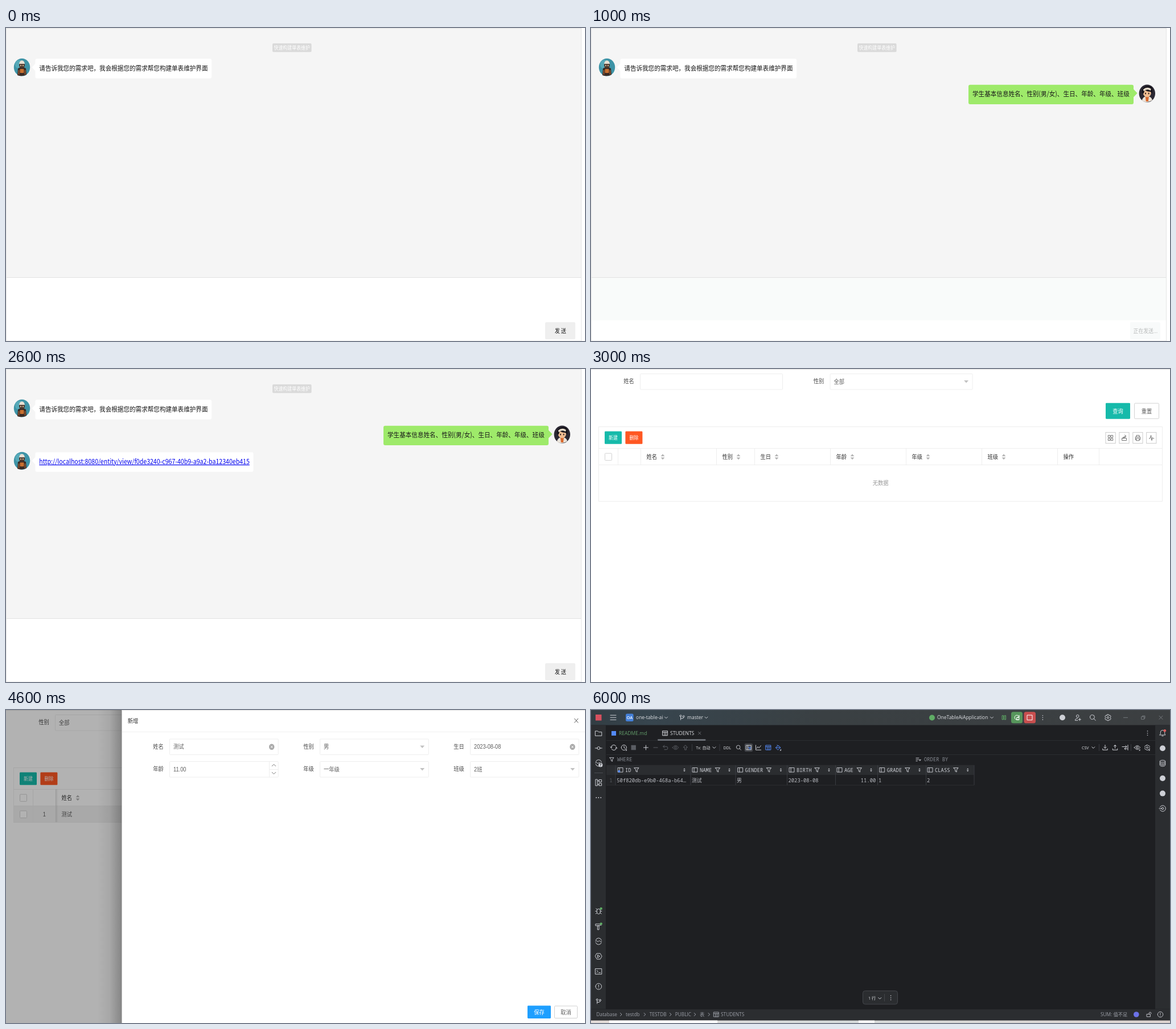
These frames come from a looping animation (1017 by 550 pixels, 7000 ms). An HTML page:

```html
<!DOCTYPE html>
<html lang="zh">
<head>
<meta charset="utf-8">
<title>单表维护</title>
<style>
html, body { margin: 0; width: 100%; height: 100%; overflow: hidden; background: #fff; }
svg { display: block; width: 1017px; height: 550px; }
.scene { opacity: 0; animation: turn 7s step-end infinite; }
@keyframes turn { 0% { opacity: 1; } 14.286%, 100% { opacity: 0; } }
.chat { font-family: "Noto Sans CJK SC", "Noto Sans CJK", sans-serif; }
.page { font-family: "Liberation Sans", "Noto Sans CJK SC", "Noto Sans CJK", sans-serif; }
.ide { font-family: "Open Sans", "Noto Sans CJK SC", "Noto Sans CJK", sans-serif; }
.mono { font-family: "Noto Sans Mono", "Noto Sans CJK SC", "Noto Sans CJK", monospace; }
.ico { fill: none; stroke-linecap: round; stroke-linejoin: round; }
</style>
</head>
<body>
<svg id="stage" viewBox="0 0 1017 550">
<defs>
  <linearGradient id="shade"><stop offset="0" stop-opacity="0"/><stop offset=".5" stop-opacity=".06"/><stop offset="1" stop-opacity=".26"/></linearGradient>
  <linearGradient id="pin"><stop offset="0" stop-opacity=".1"/><stop offset="1" stop-opacity="0"/></linearGradient>
  <linearGradient id="bar"><stop offset="0" stop-color="#323d43"/><stop offset=".1" stop-color="#37454e"/><stop offset=".4" stop-color="#3a4043"/><stop offset="1" stop-color="#3c3f41"/></linearGradient>
  <linearGradient id="task"><stop offset="0" stop-color="#e3dcd8"/><stop offset=".4" stop-color="#d5dada"/><stop offset="1" stop-color="#dcd3cf"/></linearGradient>
</defs>
</svg>
<script>
// Web pages are shown at SX by SY of their CSS size.
const SX = .6621, SY = .74;

const rect = (x, y, w, h, fill, r = 0, line = 'none') =>
  `<rect x="${x}" y="${y}" width="${w}" height="${h}" rx="${r}" fill="${fill}" stroke="${line}"/>`;
const path = (d, fill) => `<path d="${d}" fill="${fill}"/>`;
const oval = (x, y, rx, ry, fill) => `<ellipse cx="${x}" cy="${y}" rx="${rx}" ry="${ry}" fill="${fill}"/>`;
const hline = (x, y, w, c) => rect(x, y, w, 1, c);
const vline = (x, y, h, c) => rect(x, y, 1, h, c);

// Page text, centred vertically on y; size in CSS pixels.
const label = (x, y, s, { px = 14, fill = '#5f5f5f', at = 'start', w = 400, more = '' } = {}) =>
  `<text transform="translate(${x} ${y + px * SY * .38}) scale(${SX / SY} 1)" font-size="${px * SY}"
    fill="${fill}" text-anchor="${at}" font-weight="${w}" ${more}>${s}</text>`;
const mid = (x, y, s, fill, px = 14, w = 400) => label(x, y, s, { px, fill, at: 'middle', w });

/* ---------- chat ---------- */
const robot = y => `<g transform="translate(28 ${y})">` +
  oval(0, 0, 14.2, 15.6, '#3d93a6') + oval(-4, -5, 8, 8, '#56a9b8') +
  path('M-8 14L-7 2Q0-3 7 2L8 13Q0 17-8 14Z', '#3a2b25') +
  oval(0, -4, 5, 6, '#4a352c') + path('M-5-6Q-4-12 0-12T5-6Z', '#e8e0d3') +
  oval(-2, -3, 1.2, 1.4, '#c9b08f') + oval(2, -3, 1.2, 1.4, '#c9b08f') +
  rect(-3.5, 3, 7, 7, '#c8702f', 1) + rect(-6.5, 5, 2, 8, '#8a5432') + rect(4.5, 5, 2, 8, '#8a5432') + '</g>';

const boy = y => `<g transform="translate(976.8 ${y})">` +
  oval(0, 0, 14.2, 15.6, '#2b2833') +
  path('M-9 13Q-8 5 0 5T9 12Q0 18-9 13Z', '#e9e2d8') + path('M-3 6L3 6L2 14L-2 14Z', '#d9682d') +
  oval(0, -1, 7, 7.5, '#f0bd92') + path('M-9-1Q-10-12 1-13T9 0L6-3Q0-3-4-6L-6 0Z', '#17141b') +
  path('M-7-7Q0-13 7-8L6-5Q0-9-6-4Z', '#e6dccb') +
  oval(-2.8, 0, 1, 1.5, '#2a1c1a') + oval(2.8, 0, 1, 1.5, '#2a1c1a') + '</g>';

const bubble = (y, w, s, more = {}) => robot(y + 15) + rect(51.5, y, w, 34.4, '#fff', 3) +
  path(`M45.5 ${y + 15}L52 ${y + 8}V${y + 22}Z`, '#fff') +
  label(58.3, y + 16.1, s, { px: 16, fill: '#1a1a1a', ...more });

function chat(step) {
  const busy = step === 1;
  let out = rect(0, 0, 1017, 550, '#fff') + rect(0, 0, 1010, 439, '#f5f5f5') +
    hline(0, 0, 1011, '#e4e4e4') + hline(0, 438, 1011, '#e2e2e2') + hline(0, 549, 1011, '#f0f0f0') +
    vline(0, 0, 550, '#e6e6e6') + vline(1010, 0, 550, '#e6e6e6') +
    rect(468, 27, 68.6, 15.2, '#dadada', 2) + mid(502.2, 34.7, '快速构建单表维护', '#fff', 12, 500) +
    bubble(54, 309.7, '请告诉我您的需求吧，我会根据您的需求帮您构建单表维护界面');
  if (step) out += rect(663, 99.7, 290, 34.4, '#9eea6a', 3) + path('M959.6 114.5L952.5 107V122Z', '#9eea6a') +
    label(670, 116, '学生基本信息姓名、性别(男/女)、生日、年龄、年级、班级', { px: 16, fill: '#1a1a1a' }) + boy(115);
  if (step === 2) out += bubble(146.3, 383,
    'http://localhost:8080/entity/view/f0de3240-c967-40b9-a9a2-ba12340eb415',
    { fill: '#0000ee', more: 'text-decoration="underline"' });
  if (busy) out += rect(1, 439, 1009, 74.5, '#f9fbfa');
  return out + rect(947, 517, 53, 30, busy ? '#f8fafa' : '#efefef', 2) +
    mid(973.9, 532.5, busy ? '正在发送...' : '发 送', busy ? '#b8baba' : '#111', 13.333);
}

/* ---------- table page ---------- */
const EDGE = '#eeeeee', TEAL = '#16baaa';
const caret = (x, y) => path(`M${x - 4} ${y - 2}H${x + 4}L${x} ${y + 2.4}Z`, '#c2c2c2');
const check = y => rect(24.5, y - 6.2, 12, 12.4, '#fff', 1, '#d2d2d2');
const button = (x, y, w, h, s, fill, px) => rect(x, y, w, h, fill, 1.4) + mid(x + w / 2, y + h / 2, s, '#fff', px, 500);
const ghost = (x, y, w, h, s) => rect(x + .5, y + .5, w - 1, h - 1, '#fff', 1.4, '#d2d2d2') + mid(x + w / 2, y + h / 2, s, '#5f5f5f');
const field = (x, y, w, name, value, pick) =>
  label(x - 10.3, y + 13.5, name, { at: 'end', fill: '#4a4a4a' }) + rect(x + .5, y + .5, w, 27.5, '#fff', 1, EDGE) +
  label(x + 7, y + 14, value) + (pick ? caret(x + w - 10.5, y + 14) : '');
const sorter = x => path(`M${x - 3.4} 153.2H${x + 3.4}L${x} 149.4ZM${x - 3.4} 155.4H${x + 3.4}L${x} 159.2Z`, '#b2b2b2');

const TOOLS = [
  'M-4-4.5H-.8V-.8H-4ZM.8-4.5H4V-.8H.8ZM-4 1H-.8V4.6H-4ZM.8 1H4V4.6H.8Z',
  'M-4 1V4.5H4V1ZM-3 1L-2-1H2M-1 1Q-1-3 2-3M1-5L3.4-3L1-1',
  'M-2.6-1.5V-4.5H2.6V-1.5M-2.6 3H-4.2V-1.5H4.2V3H2.6M-2.6 1H2.6V4.8H-2.6Z',
  'M-4 1H-2.4L-.8-4.5L.6 4.5L1.8-.5L3 1H4.4'];

function table(filters, heads, widths, row, hover) {
  const bottom = row ? 197 : 232;
  let out = rect(0, 0, 1017, 550, '#fff') + hline(0, 0, 1017, '#e2e2e2') +
    filters.map(([n, v], i) => field(86 + i * 333.6, 8, 250, n, v, v)).join('') +
    button(904, 59.7, 43, 28, '查询', TEAL) + ghost(954, 59.7, 44, 28, '重置') +
    rect(13.5, 101.5, 990, bottom - 101, '#fff', 0, EDGE) +
    (hover ? rect(14, 169, 989, 28, '#f2f2f2') : '') +
    button(24, 109.5, 30, 22.3, '新建', TEAL, 12) + button(60.4, 109.5, 30, 22.3, '删除', '#ff5722', 12) +
    TOOLS.map((d, i) => `<g transform="translate(${912.7 + i * 23.9} 121)">` + rect(-8.7, -9.6, 17.2, 19.2, '#fff', 0, '#cccccc') +
      `<path class="ico" d="${d}" stroke="#666" stroke-width=".9"/></g>`).join('') +
    hline(14, 139, 989, EDGE) + hline(14, 168, 989, EDGE) + check(154.4) + vline(47, 139, bottom - 139 > 60 ? 29 : 58, EDGE);
  const tall = row ? 58 : 29;
  let x = 87;
  heads.forEach((h, i) => {
    out += vline(x, 139, tall, EDGE) + label(x + 10.5, 154.2, h, { fill: '#333', w: 500 });
    if (i < 6) out += sorter(x + 39);
    if (row && i < 6) out += label(x + 10.5, 183.2, row[i]);
    x += widths[i];
  });
  out += vline(x, 139, tall, row ? '#e2e2e2' : EDGE);
  if (!row) return out + mid(508.7, 200.3, '无数据', '#999');
  return out + rect(87, 139, 5, 58, 'url(#pin)') + check(183.4) + mid(67.4, 183.2, '1', '#5f5f5f') +
    button(895, 175.2, 24, 16.3, '删除', TEAL, 12) + button(925.3, 175.2, 24, 16.3, '编辑', TEAL, 12);
}

const HEADS = ['姓名', '性别', '生日', '年龄', '年级', '班级', '操作'];
const empty = () => table([['姓名', ''], ['性别', '全部']], HEADS, [133, 67, 133, 133, 133, 133, 73]);
const filled = hover => table(['性别', '年级', '班级'].map(n => [n, '全部']), HEADS,
  [133, 133, 133, 133, 133, 133, 73], ['测试', '男', '2023-08-08', '11', '一年级', '2班'], hover);

const clear = (x, y) => oval(x, y, 4.7, 5.2, '#a8a8a8') +
  `<path class="ico" d="M${x - 1.6} ${y - 1.8}l3.2 3.6m0-3.6l-3.2 3.6" stroke="#fff"/>`;

function drawer() {
  const cells = [['姓名', '测试'], ['性别', '男', 1], ['生日', '2023-08-08'], ['年龄', '11.00'], ['年级', '一年级', 1], ['班级', '2班', 1]];
  return filled(true) + rect(0, 0, 1017, 550, 'rgba(0,0,0,.3)') + rect(160, 0, 44, 550, 'url(#shade)') +
    rect(203.5, 0, 814, 550, '#fff') + hline(203.5, 0, 814, '#e2e2e2') +
    label(213.7, 19, '新增', { fill: '#333' }) + hline(204, 38, 813, '#f0f0f0') +
    '<path class="ico" d="M998.6 15.2l6.2 7m0-7l-6.2 7" stroke="#555"/>' +
    cells.map(([n, v, p], i) => field(287 + i % 3 * 264, i < 3 ? 50.5 : 90, 190.7, n, v, p)).join('') +
    clear(466.7, 64.8) + clear(995, 64.8) + vline(462, 91, 27, EDGE) + hline(462, 104, 16, EDGE) +
    '<path class="ico" d="M467.3 98.6l3.2-3.2l3.2 3.2M467.3 109.4l3.2 3.2l3.2-3.2" stroke="#777"/>' +
    button(916, 519.6, 41, 22.4, '保存', '#1e9fff') + ghost(963, 519.6, 41, 22.4, '取消');
}

/* ---------- IDE ---------- */
const GREY = '#ced0d6', DIM = '#5a5d63', BLUE = '#548af7', GREEN = '#5fad65';
const ICONS = {
  menu: 'M-5-4H5M-5 0H5M-5 4H5',
  down: 'M-2.5-1.2L0 1.3L2.5-1.2',
  right: 'M-1.2-2.6L1.4 0L-1.2 2.6',
  branch: 'M-2.5 4V-1.8M-2.5 1.5H1Q2.7 1.5 2.7-.6M-4-3a1.5 1.5 0 1 0 3 0a1.5 1.5 0 1 0-3 0M1.2-2a1.5 1.5 0 1 0 3 0a1.5 1.5 0 1 0-3 0',
  pause: 'M-3-3.5H-1V3.5H-3ZM1-3.5H3V3.5H1Z',
  stop: 'M-4.3-4.3H4.3V4.3H-4.3Z',
  rerun: 'M4-1A4 4 0 1 0 2.5 3M4-4V-1H1M0 0H4V4H0Z',
  user: 'M-2.6-2.5a2.3 2.3 0 1 0 4.6 0a2.3 2.3 0 1 0-4.6 0M0 5H-4.6Q-4.6 1.5-.5 1.5M3.4 1.2V5.4M1.3 3.3H5.5',
  search: 'M-4.7-.8a3.9 3.9 0 1 0 7.8 0a3.9 3.9 0 1 0-7.8 0M2 2.2L5 5',
  gear: 'M-1.2-5.3H1.2L1.8-3.8L3.9-4L5.2-1.9L4.2-.3V.3L5.2 1.9L3.9 4L1.8 3.8L1.2 5.3H-1.2L-1.8 3.8L-3.9 4L-5.2 1.9L-4.2.3V-.3L-5.2-1.9L-3.9-4L-1.8-3.8ZM-1.7 0a1.7 1.7 0 1 0 3.4 0a1.7 1.7 0 1 0-3.4 0',
  minus: 'M-3.6 0H3.6',
  plus: 'M-4 0H4M0-4V4',
  restore: 'M-3-1.5H1.5V3H-3ZM-1.5-1.5V-3H3V1.5H1.5',
  cross: 'M-3-3L3 3M3-3L-3 3',
  folder: 'M-5.5-4H-1.5L0-2.3H5.5V4.3H-5.5Z',
  commit: 'M-6 0H-2.5M2.5 0H6M-2.5 0a2.5 2.5 0 1 0 5 0a2.5 2.5 0 1 0-5 0',
  wave: 'M-5-2A5.3 5.3 0 0 1 5-2M-5 2.4A5.3 5.3 0 0 0 5 2.4M-5.5 0Q-4-2-2.5 0T0 0T2.5 0T5.5 0',
  tree: 'M-5-5.5H-2V5.5H-5ZM1-5H5.3V-1H1ZM1 1.4H5.3V5.4H1ZM-2-3H1M-2 3.4H1',
  bug: 'M-3-1.5Q-3-4 0-4T3-1.5V1.5Q3 5 0 5T-3 1.5ZM-3 0H-5.5M3 0H5.5M-3 3L-5 4.5M3 3L5 4.5M-2.5-3L-4.5-4.5',
  hammer: 'M-5-4.5H2.5L5-2.5H2V-1.5H-5ZM-1.5-1.5H.7V5.5H-1.5Z',
  play: 'M-3-5H3L5.8 0L3 5H-3L-5.8 0ZM-1.4-2.3L2.3 0L-1.4 2.3Z',
  term: 'M-5.5-4.8H5.5V4.8H-5.5ZM-3.2-2L-1.2 0L-3.2 2M.3 2.2H3.2',
  warn: 'M-5.3 0a5.3 5.3 0 1 0 10.6 0a5.3 5.3 0 1 0-10.6 0M0-2.8V.6M0 2.5V2.7',
  bell: 'M-5 3.2H5L3.7 1.2V-1.5A3.7 3.7 0 0 0-3.7-1.5V1.2ZM-1.2 5H1.2',
  base: 'M-4.7-3.5a4.7 1.8 0 1 0 9.4 0a4.7 1.8 0 1 0-9.4 0V3.6Q-4 5.5 0 5.5T4.7 3.6V-3.5M-4.7-.9Q-4 1 0 1T4.7-.9M-4.7 1.5Q-4 3.3 0 3.3T4.7 1.5',
  ring: 'M-4.4-2.6A5.2 5.2 0 1 1-4.4 2.6M-6 0H-1.8M-1.8 0a1.8 1.8 0 1 0 3.6 0a1.8 1.8 0 1 0-3.6 0',
  grid: 'M-4.3-4H4.3V4H-4.3ZM-4.3-1.6H4.3M-1.4-1.6V4M1.4-1.6V4',
  sync: 'M-4.6-.5A4.5 4.5 0 0 1 4-2M4.6.5A4.5 4.5 0 0 1-4 2M-6-1.2L-4.6.6L-3-1M6 1.2L4.6-.6L3 1',
  clock: 'M-4.8 0a4.6 4.6 0 1 0 9.2 0a4.6 4.6 0 1 0-9.2 0M0-2.6V.3L2 1.4',
  undo: 'M-2-4L-4.3-1.8L-2 .4M-4.3-1.8H1.2A2.6 2.6 0 0 1 1.2 3.6H-2',
  eye: 'M-5.2 0Q0-7 5.2 0Q0 7-5.2 0ZM-1.7 0a1.7 1.7 0 1 0 3.4 0a1.7 1.7 0 1 0-3.4 0',
  up: 'M0-4L3.5-.2H1.3V4H-1.3V-.2H-3.5Z',
  chart: 'M-4.6-4.2V4.2H4.6M-3 1.5L-.8-1.5L1 .8L4.4-3.4',
  paint: 'M-3.8 0L.2-4L4.2 0L.2 4ZM-1.6-4.6L.2-2.8M-3.8 0H4.2M5 3V3.5',
  save: 'M0-4.5V1.2M-2.3-1L0 1.3L2.3-1M-4.2 2V4.2H4.2V2',
  load: 'M0 1.2V-4.5M-2.3-2.2L0-4.5L2.3-2.2M-4.2 2V4.2H4.2V2',
  swap: 'M-5-1.5H3M1-3.5L3-1.5L1 .5M5-4.5V4.5M4 2H-1M1 .5L-1 2L1 3.8',
  filter: 'M-4-3.6H4L1.2 0V3.6L-1.2 2.4V0Z',
  order: 'M-4.5-3H1M-4.5 0H0M-4.5 3H-2M1.6.4H5L3.3 2.3Z',
  column: 'M-4.3-3.8H4.3V3.8H-4.3ZM-1.6-3.8V3.8',
  lock: 'M-3.4-.6H3.2V4.4H-3.4ZM.8-.6V-2.4A2 2 0 0 1 4.8-2.4V-1.4'
};
const ico = (n, x, y, c = GREY, k = 1, w = 1) =>
  `<path class="ico" transform="translate(${x} ${y}) scale(${k})" d="${ICONS[n]}" stroke="${c}" stroke-width="${w}"/>`;
const dot = (x, y, r, c) => oval(x, y, r, r, c);
const dots = (x, y, flat) => [-4, 0, 4].map(d => flat ? dot(x + d, y, .9, GREY) : dot(x, y + d * .9, .8, GREY)).join('');
const txt = (x, y, s, size = 8.5, fill = '#dfe1e5', more = '') =>
  `<text x="${x}" y="${y}" font-size="${size}" fill="${fill}" ${more}>${s}</text>`;
const code = (x, y, s, fill = '#bcbec4', more = '') => txt(x, y, s, 8.83, fill, `class="mono" ${more}`);
const row = (y, list, c, k) => list.map(([n, x]) => ico(n, x, y, c, k)).join('');
const col = (x, list) => list.map(([n, y]) => ico(n, x, y)).join('');

function ide() {
  const PANEL = '#2b2d30', RULE = '#393b40', MUTE = '#9da0a8';
  let out = rect(0, 0, 1017, 550, '#1e1f22') + rect(0, 0, 1017, 26.5, 'url(#bar)') +
    rect(0, 26.5, 26, 499, PANEL) + rect(991, 26.5, 26, 499, PANEL) + rect(0, 526, 1017, 19.5, PANEL) +
    hline(27, 53, 964, PANEL) + hline(27, 78, 964, PANEL);
  // title bar
  out += rect(8, 8, 10.5, 10.5, '#d5505f') + ico('menu', 39, 13.2) +
    rect(61, 6.5, 13.6, 13.4, '#4480d8', 2.5) + txt(67.8, 16, 'OA', 7.4, '#fff', 'text-anchor="middle" font-weight="600"') +
    txt(79, 16.3, 'one-table-ai') + txt(169, 16.3, 'master') + txt(608, 16.3, 'OneTableAiApplication') +
    row(13.3, [['down', 132], ['down', 202.4], ['down', 704], ['branch', 160]]) +
    dot(599, 13.5, 5, GREEN) + ico('pause', 725.5, 13.3, GREEN) +
    rect(738, 3.3, 20, 20, '#57965c', 3.5) + ico('rerun', 748, 13.3, '#fff') +
    rect(760.5, 3.3, 20.5, 20, '#c94f4f', 3.5) + ico('stop', 770.7, 13.3, '#fff') +
    dots(793.4, 13.3) + dot(828, 13.3, 5, GREY) + row(13.3, [['user', 855], ['search', 881.3], ['gear', 908]]) +
    row(13.3, [['minus', 939], ['restore', 970], ['cross', 1001]], '#74787c');
  // side strips
  out += col(13.3, [['folder', 41], ['commit', 67], ['wave', 93], ['tree', 127.5], ['bug', 353.5], ['hammer', 380.5],
      ['wave', 406.3], ['play', 432.8], ['term', 459.4], ['warn', 485.8], ['branch', 512]]) +
    dot(16.8, 96.7, 3.6, GREY) + txt(16.8, 99.1, '?', 6.5, PANEL, 'text-anchor="middle" font-weight="700"') +
    hline(6, 110, 15, '#4a4d52') + dots(13.3, 154, true) +
    dot(17.7, 349, 2.2, GREEN) + dot(17.7, 375.6, 2.2, GREEN) +
    col(1004, [['bell', 40.7], ['base', 93.5], ['ring', 173]]) + dot(1007.8, 36.3, 2.4, '#db5c5c') +
    [67.3, 120, 146.6].map(y => dot(1004, y, 5, GREY)).join('');
  // tabs
  out += rect(36, 37, 8, 8, BLUE) + txt(49, 44.2, 'README.md', 8.5, '#64a06c') +
    ico('grid', 130.2, 40.8) + txt(139, 44.2, 'STUDENTS') + ico('cross', 190.7, 40.7, '#868a91', .75) +
    rect(117, 51.3, 84.5, 2.6, '#6f737a', 1.3) + dots(977.5, 40.7);
  // toolbar
  const ty = 66;
  out += row(ty, [['sync', 40], ['clock', 58], ['plus', 96.4]]) + rect(70.5, 61.8, 8.4, 8.4, DIM, .5) +
    row(ty, [['minus', 113.5], ['undo', 131], ['eye', 148.5], ['up', 166]], DIM) +
    vline(177, 60, 12, RULE) + txt(184.3, 68.6, 'Tx: 自动', 7) + ico('down', 216.4, ty) +
    vline(225.5, 60, 12, RULE) + txt(232.4, 68.6, 'DDL', 7) + ico('search', 259.3, ty, GREY, .85) +
    rect(269.7, 58.8, 14.4, 14.4, '#43454a', 2.5) + ico('column', 277, ty) + ico('filter', 279, 67.5, BLUE, .5, 1.8) +
    ico('chart', 294, ty) + ico('grid', 311.5, ty, BLUE) + ico('paint', 328.5, ty, BLUE) +
    txt(862, 68.6, 'CSV', 7) + ico('down', 882.3, ty) + vline(892, 60, 12, RULE) + vline(948, 60, 12, RULE) +
    row(ty, [['save', 903], ['load', 920.5], ['swap', 938], ['eye', 959.5]]) + ico('gear', 977, ty, GREY, .85) +
    [63, 334, 964.5, 981.5].map(x => path(`M${x} 68.8V71.4H${x - 2.6}Z`, GREY)).join('');
  // data grid
  out += ico('filter', 36.5, 87, GREY, .9) + code(46, 90, 'WHERE', '#868a91') + ico('order', 575, 87, GREY, .9) +
    code(585, 90, 'ORDER BY', '#868a91') +
    rect(27, 96.7, 646, 17.3, PANEL) + rect(27, 114, 16, 18, '#232427') + hline(27, 131.6, 646, PANEL);
  [['ID', 60, 80, 164], ['NAME', 191, 222.5, 243], ['GENDER', 270.6, 312.5, 333.4], ['BIRTH', 361, 397.2, 418],
   ['AGE', 445, 471.4, 492], ['GRADE', 519.7, 556, 577], ['CLASS', 604, 641, 661.7]].forEach(([n, x, f, s], i) => {
    out += ico('column', x - 8.3, 105.3, GREY, 1, .9) + code(x, 108.5, n, GREY) + ico('filter', f, 105.3) +
      path(`M${s - 1.8} 104.6h3.6l-1.8-2.2zM${s - 1.8} 106h3.6l-1.8 2.2z`, GREY);
    if (!i) out += dot(49.3, 107.8, 2, BLUE);
  });
  out += [42.5, 174.5, 253.5, 344, 429, 503, 588, 672.5].map(x => vline(x, 97, 35, RULE)).join('') +
    code(32.3, 126.7, '1', DIM) +
    [['50f820db-e9b0-468a-b64…', 45.3], ['测试', 177], ['男', 256], ['2023-08-08', 346.5], ['1', 505], ['2', 590]]
      .map(([s, x]) => code(x, 126.7, s)).join('') + code(500.3, 126.7, '11.00', '#bcbec4', 'text-anchor="end"');
  // pager
  out += rect(477.5, 493.5, 61, 23.5, PANEL, 4, '#43454a') + txt(487, 508.7, '1 行', 7.2) + ico('down', 507.3, 506.6) +
    vline(515, 499, 13, '#43454a') + dots(526.6, 505.7);
  // status bar
  out += [['Database', 9.5], ['testdb', 61], ['TESTDB', 102.8], ['PUBLIC', 147.8], ['表', 191], ['STUDENTS', 228], ['SUM: 值不足', 895]]
      .map(([s, x]) => txt(x, 538, s, 8.3, MUTE)).join('') +
    row(535, [['right', 52.6], ['right', 94.3], ['right', 139.6], ['right', 182.4], ['right', 207.2], ['grid', 220]], MUTE) +
    dot(957.8, 535, 4.8, '#6c72e8') + row(535, [['lock', 979.5], ['warn', 1000]], GREY, .9);
  return out + rect(0, 545.5, 1017, 4.5, 'url(#task)') + rect(32, 545.5, 190, 4.5, '#fff') + rect(470, 545.5, 28, 4.5, '#f7f7f7');
}

const scenes = [['chat', chat(0)], ['chat', chat(1)], ['chat', chat(2)], ['page', empty()],
  ['page', drawer()], ['page', filled()], ['ide', ide()]];
document.getElementById('stage').insertAdjacentHTML('beforeend', scenes.map(([kind, body], i) =>
  `<g class="scene ${kind}" style="animation-delay:${i ? i - 7 : 0}s">${body}</g>`).join(''));
</script>
</body>
</html>
```
